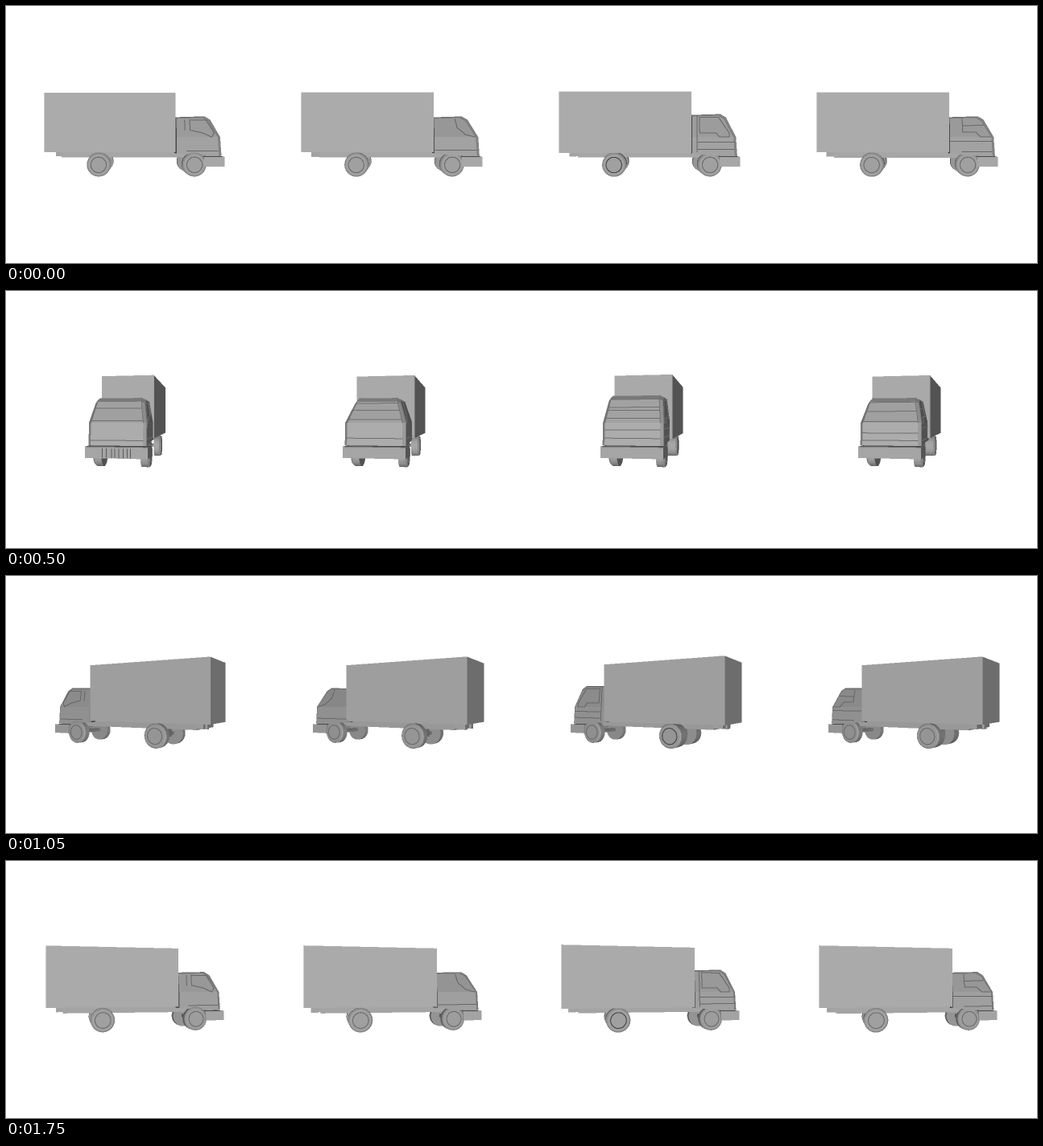
Animation of 1280 by 320 pixels, one loop 1.8 s. Source, as an HTML page with a canvas:

```html
<!DOCTYPE html>
<html lang="en">
<head>
<meta charset="utf-8">
<title>Turntable trucks</title>
<style>
  html, body { margin: 0; width: 100%; height: 100%; overflow: hidden; background: #fff; }
  canvas { display: block; }
</style>
</head>
<body>
<canvas id="stage" width="1280" height="320"></canvas>
<script>
const STEP_MS = 50, STEPS = 36;
const CAMERA = 423;                 // distance; one unit is one pixel at the turntable axis
const LIGHT = 760;                  // the lamp sits behind the camera
const SS = 2, TOP = 80, BAND = 150; // supersampling and the rendered strip
const W = 1280 * SS, H = BAND * SS;

// Vertices are [along, up, across]; "across" faces the viewer at angle 0.
class Model {
  constructor() { this.faces = []; this.lines = []; }

  face(points, tone = 1) {
    const normal = [0, 0, 0], center = [0, 0, 0];
    points.forEach((p, i) => {
      const q = points[(i + 1) % points.length];
      for (let a = 0; a < 3; a++) {
        const b = (a + 1) % 3, c = (a + 2) % 3;
        normal[a] += (p[b] - q[b]) * (p[c] + q[c]);
        center[a] += p[a] / points.length;
      }
    });
    const length = Math.hypot(...normal) || 1;
    this.faces.push({ points, tone, center, normal: normal.map(v => v / length) });
  }

  line(points, gray = 104) { this.lines.push({ points, gray }); }

  // Joins equal outlines, one after another.
  loft(rings, tone) {
    for (let r = 1; r < rings.length; r++) {
      const a = rings[r - 1], b = rings[r];
      a.forEach((p, i) => {
        const j = (i + 1) % a.length;
        this.face([p, a[j], b[j], b[i]], tone);
      });
    }
  }

  box(x0, x1, y0, y1, n0, n1, tone) {
    const ring = n => [[x0, y0, n], [x1, y0, n], [x1, y1, n], [x0, y1, n]];
    const rings = [ring(n0), ring(n1)];
    this.loft(rings, tone);
    rings.forEach(r => this.face(r, tone));
  }

  wheel(x, side, outer, width, ringGray) {
    const circle = (r, n) => Array.from({ length: 24 }, (_, i) => {
      const a = i * Math.PI / 12;
      return [x + r * Math.cos(a), -35.2 + r * Math.sin(a), side * n];
    });
    const rings = [circle(13.9, outer - width), circle(13.9, outer - 1.5), circle(12.4, outer)];
    this.loft(rings, 0.98);
    this.face(rings[0], 0.88);
    this.face(rings[2], 0.94);
    const hub = circle(9, outer + 0.2);
    this.line([...hub, hub[0]], ringGray);
    this.line([...rings[1], rings[1][0]], 132);
  }
}

const lerp = (a, b, k) => a + (b - a) * k;

function buildCab(model, { roof, half, taper, windows, seams, stripes }) {
  const belt = -3, round = 3;
  const outline = [[48.5, roof - 1], [82, roof], [88.5, roof - 4], [99.5, belt],
                   [101, -25], [82, -25], [48.5, -22], [48.5, belt]];
  const widthAt = y => half - taper * Math.max(0, (y - belt) / (roof - belt));
  const slice = (side, inset) => outline.map(([x, y], i) => [
    i > 0 && i < 5 ? x - (round - inset) : x,
    i < 3 ? y - (round - inset) * 0.5 : y,
    side * (widthAt(y) - inset)
  ]);
  const slices = [slice(1, 0), slice(1, round), slice(-1, round), slice(-1, 0)];
  model.loft(slices, 1.02);
  for (const s of [slices[0], slices[3]]) {
    model.face([s[0], s[1], s[2], s[3], s[7]], 0.92);
    model.face([s[7], s[3], s[4], s[5], s[6]], 0.95);
    model.line(s.slice(0, 5), 122);
  }
  model.line(slices[1].slice(1, 4), 118);
  model.line(slices[2].slice(1, 4), 118);

  for (const side of [1, -1]) {
    for (const path of [...windows, ...seams])
      model.line(path.map(([x, y]) => [x, y, side * (widthAt(y) + 0.2)]));
  }
  const frontAt = y => {
    const i = y > roof - 4 ? 1 : y > belt ? 2 : 3;
    const [a, b] = [outline[i], outline[i + 1]];
    return lerp(a[0], b[0], (y - a[1]) / (b[1] - a[1]));
  };
  for (const y of stripes) {
    const n = widthAt(y) - round;
    model.line([[frontAt(y), y, n], [frontAt(y), y, -n]], 112);
  }
}

function buildTruck(spec) {
  const { half, top, bottom, rear, tyre, track, rail, cabHalf, tail } = spec;
  const back = -104.8, bumperHalf = 30.5;
  const m = new Model();
  m.box(back, 47, bottom, top, -half, half, 1);
  m.corners = [[back, half], [back, -half], [47, half], [47, -half]]
    .map(([x, n]) => [[x, bottom, n], [x, top, n]]);

  m.box(47.1, 48.5, -22, spec.roof - 2, -cabHalf + spec.taper, cabHalf - spec.taper, 0.4);
  buildCab(m, { ...spec, half: cabHalf });
  m.box(80, 103.4, -37, -26, -bumperHalf, bumperHalf, 0.98);
  m.line([[103.6, -26, bumperHalf], [103.6, -26, -bumperHalf]], 112);

  m.box(-87, 78, -27.5, bottom, -rail, rail, 0.97);
  m.box(rear, -87, -26, bottom, -rail, rail, 0.95);
  for (const [n0, n1] of tail) m.box(rear - 2, rear + 6, -27, bottom, n0, n1, 0.98);
  m.box(-44, -40, -37, -33, -24, 24, 0.9);
  m.box(-47, -37, -38, -27, -5, 5, 0.85);
  m.box(67, 71, -37, -33, -24, 24, 0.85);
  for (const side of [1, -1]) {
    m.wheel(-42, side, track, tyre, spec.hub || 108);
    m.wheel(69, side, 29, 9, 108);
  }
  for (const n of spec.grille || []) m.line([[103.7, -28, n], [103.7, -36, n]], 92);
  return m;
}

const shared = {
  half: 32.4, top: 48.3, bottom: -20.4, roof: 21.5, rear: -96, cabHalf: 30, taper: 5, rail: 18
};
const trucks = [
  { ...shared, half: 29.2, top: 48.6, rear: -94, tyre: 9, track: 29, cabHalf: 28.5, taper: 4,
    tail: [[-11, -5]], grille: [-14, -11, -7, -3, 1, 4, 9, 13],
    windows: [[[64, 17], [83, 17], [92, 2], [89, -3], [78, 2], [64, 5], [64, 17]], [[58, 17], [58, 5]]],
    seams: [[[60, -19], [96, -19]]], stripes: [11, -1, -20] },
  { ...shared, tyre: 10.5, track: 30, taper: 8, tail: [[-17, -8], [4, 12]],
    windows: [[[73, 18], [75, 8], [84, 0], [95, -3]]],
    seams: [[[49, -18], [97, -18]]], stripes: [16, 9, 0, -18] },
  { ...shared, top: 49.2, bottom: -21.2, roof: 24, rear: -97, tyre: 17, track: 30.5, rail: 14, hub: 70,
    taper: 3, tail: [[-4, 6]],
    windows: [[[57, 20], [79, 20], [91, 2], [91, -3], [80, -3], [76, 2], [57, 2], [57, 20]]],
    seams: [[[54, 21], [54, -20]], [[54, -9], [97, -9]], [[54, -17], [97, -17]]],
    stripes: [20, 12, 9, 1, -10, -18] },
  { ...shared, tyre: 17, track: 30.5, rail: 22, tail: [[-5, 5]],
    windows: [[[63, 18], [63, 3], [78, 3], [84, -3], [95, -3]], [[63, 10], [87, 11]]],
    seams: [[[49, -8], [97, -8]], [[62, -20], [97, -20]]], stripes: [17, 8, -2, -13, -20] }
].map(buildTruck);

const buffer = document.createElement('canvas');
buffer.width = W;
buffer.height = H;
const bufferCtx = buffer.getContext('2d');
const image = bufferCtx.createImageData(W, H);
const pixels = new Uint32Array(image.data.buffer);
const nearness = new Float32Array(W * H);
const ink = gray => (0xff000000 | Math.max(0, Math.min(255, Math.round(gray))) * 0x010101) >>> 0;

function fillTriangle(a, b, c, color) {
  const area = (b[0] - a[0]) * (c[1] - a[1]) - (b[1] - a[1]) * (c[0] - a[0]);
  if (Math.abs(area) < 1e-6) return;
  const x0 = Math.max(0, Math.floor(Math.min(a[0], b[0], c[0])));
  const x1 = Math.min(W - 1, Math.ceil(Math.max(a[0], b[0], c[0])));
  const y0 = Math.max(0, Math.floor(Math.min(a[1], b[1], c[1])));
  const y1 = Math.min(H - 1, Math.ceil(Math.max(a[1], b[1], c[1])));
  const ux = (b[1] - c[1]) / area, uy = (c[0] - b[0]) / area;
  const vx = (c[1] - a[1]) / area, vy = (a[0] - c[0]) / area;
  for (let y = y0; y <= y1; y++) {
    const dx = x0 + 0.5 - c[0], dy = y + 0.5 - c[1];
    let u = ux * dx + uy * dy, v = vx * dx + vy * dy;
    for (let x = x0, i = y * W + x0; x <= x1; x++, i++, u += ux, v += vx) {
      if (u < 0 || v < 0 || u + v > 1) continue;
      const near = u * a[2] + v * b[2] + (1 - u - v) * c[2];
      if (near > nearness[i]) { nearness[i] = near; pixels[i] = color; }
    }
  }
}

function strokeSegment(a, b, color) {
  const count = Math.ceil(Math.max(Math.abs(b[0] - a[0]), Math.abs(b[1] - a[1]))) || 1;
  for (let s = 0; s <= count; s++) {
    const k = s / count, near = lerp(a[2], b[2], k) * 1.004;
    const x = Math.round(lerp(a[0], b[0], k)), y = Math.round(lerp(a[1], b[1], k));
    // Lines only mark surfaces, so they never spill onto the background.
    for (const i of [y * W + x, y * W + x - 1, (y - 1) * W + x, (y - 1) * W + x - 1])
      if (nearness[i] > 0 && near > nearness[i]) pixels[i] = color;
  }
}

function drawTruck(model, centerX, angle) {
  const cos = Math.cos(angle), sin = Math.sin(angle);
  const lamp = [LIGHT * sin, 0, LIGHT * cos];
  const project = ([x, y, n]) => {
    const k = CAMERA / (CAMERA - x * sin - n * cos);
    return [(centerX + (x * cos - n * sin) * k) * SS, (160 - y * k - TOP) * SS, k];
  };
  for (const { points, tone, center, normal } of model.faces) {
    const ray = lamp.map((v, i) => v - center[i]);
    const facing = ray.reduce((sum, v, i) => sum + v * normal[i], 0) / Math.hypot(...ray);
    const color = ink((70 + 101 * Math.abs(facing)) * tone);
    const p = points.map(project);
    for (let i = 2; i < p.length; i++) fillTriangle(p[0], p[i - 1], p[i], color);
  }
  for (const { points, gray } of model.lines) {
    const p = points.map(project);
    for (let i = 1; i < p.length; i++) strokeSegment(p[i - 1], p[i], ink(gray));
  }
  // The vertical edge closest to the viewer catches the light.
  const edge = model.corners.map(c => c.map(project)).sort((a, b) => b[0][2] - a[0][2])[0];
  strokeSegment(edge[0], edge[1], ink(160));
}

const ctx = document.getElementById('stage').getContext('2d');
let shown = -1;

function render(step) {
  pixels.fill(0xffffffff);
  nearness.fill(0);
  trucks.forEach((truck, i) => drawTruck(truck, 160 + 320 * i, step * 2 * Math.PI / STEPS));
  bufferCtx.putImageData(image, 0, 0);
  ctx.fillStyle = '#fff';
  ctx.fillRect(0, 0, 1280, 320);
  ctx.drawImage(buffer, 0, TOP, 1280, BAND);
}

const start = performance.now();
function tick() {
  const step = Math.floor((performance.now() - start) / STEP_MS) % STEPS;
  if (step !== shown) render(shown = step);
  requestAnimationFrame(tick);
}
tick();
</script>
</body>
</html>
```
